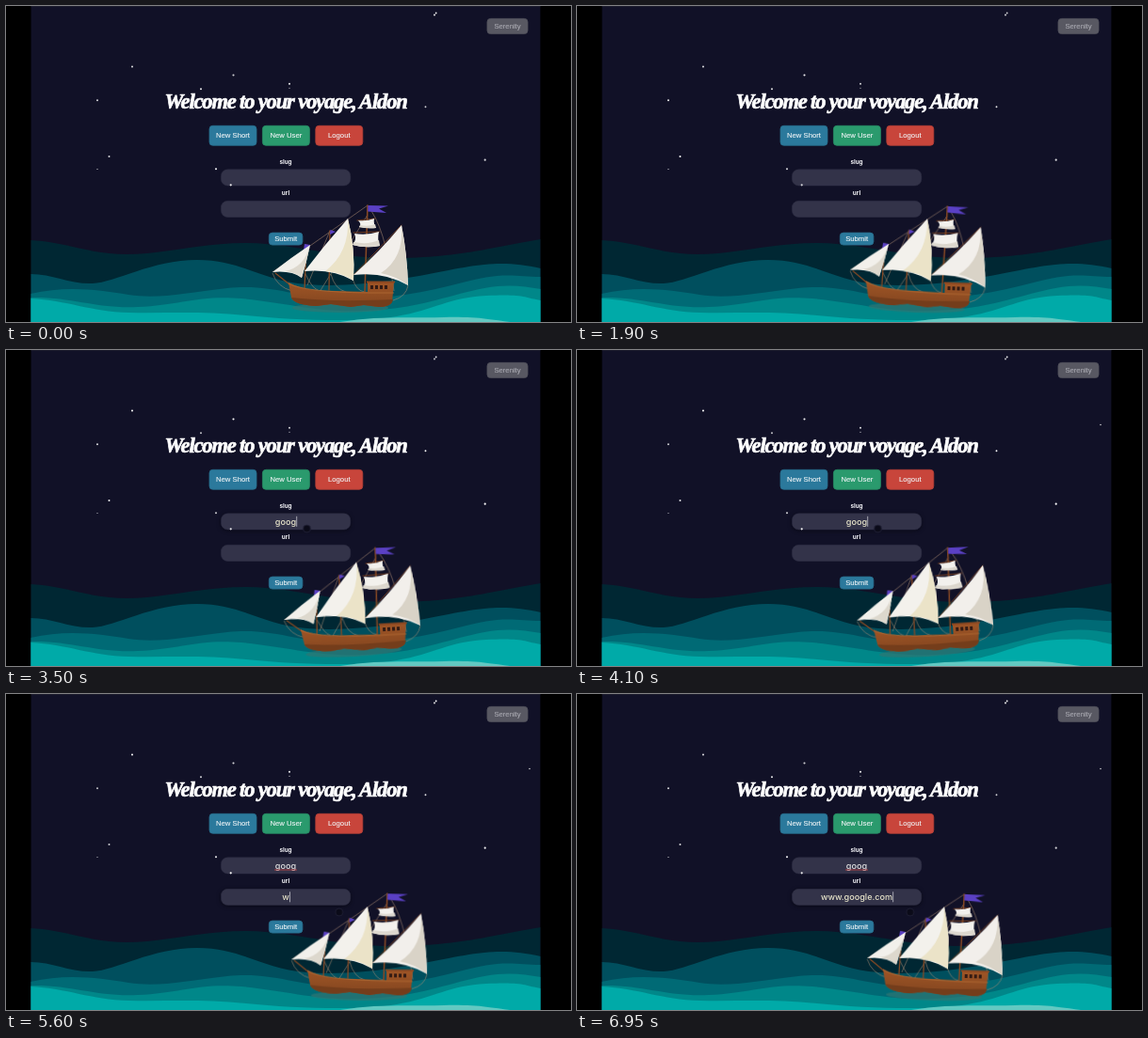
Recreate the animation shown at these times as an HTML page. Size 600 px wide and 336 px high, loop 7 s.

```html
<!DOCTYPE html>
<html lang="en">
<head>
<meta charset="utf-8">
<title>Voyage</title>
<style>
  html, body { margin: 0; width: 100%; height: 100%; overflow: hidden; background: #000; }
  svg { display: block; width: 100vw; height: 100vh; }
  text { text-anchor: middle; }
  .title { font: italic 700 22.5px "Liberation Serif", serif; letter-spacing: -1.15px; fill: #fff; stroke: #fff; stroke-width: .7px; }
  .button { font: 7.7px "Liberation Sans", sans-serif; fill: #f1f5f7; stroke: currentColor; stroke-width: .12px; color: #f1f5f7; }
  .label { font: 700 6.3px Inter, sans-serif; fill: #f4f4f8; }
  .value { font: 500 9.1px Inter, sans-serif; fill: #e6e3c9; }
  .field { fill: #333349; stroke: #2f2f45; stroke-width: .5; }

  #drift { animation: drift 7s linear infinite; }
  @keyframes drift { to { transform: translateX(25.2px); } }

  /* A five second roll, cut off by the seven second loop. */
  #rock { transform-origin: 355px 290px; animation: rock 7s infinite ease-in-out; }
  @keyframes rock {
    0%, 71.4% { transform: rotate(0deg); }
    24.3%, 95.7% { transform: rotate(2deg); }
    57% { transform: rotate(-3.8deg); }
    100% { transform: rotate(1.7deg); }
  }

  #pointer { animation: point 7s infinite ease-in-out; }
  @keyframes point {
    0%, 33% { transform: translate(341px, 215px); opacity: 0; }
    34% { transform: translate(341px, 215px); opacity: 1; }
    38%, 64% { transform: translate(319.5px, 190px); opacity: 1; }
    72%, 100% { transform: translate(353.7px, 232px); opacity: 1; }
  }

  .star { fill: #fff; animation: twinkle 3.5s infinite ease-in-out alternate; }
  @keyframes twinkle { from { opacity: 1; } to { opacity: .8; } }
  .late { animation: late 7s infinite; }
  @keyframes late { 0%, 54% { opacity: 0; } 57%, 100% { opacity: .8; } }
</style>
</head>
<body>
<svg viewBox="0 0 600 336" preserveAspectRatio="none">
  <defs>
    <clipPath id="page"><rect x="26.6" width="540.8" height="336"/></clipPath>
    <linearGradient id="wood" x2="0" y2="1">
      <stop stop-color="#9f5526"/><stop offset="1" stop-color="#82451f"/>
    </linearGradient>
  </defs>
  <g clip-path="url(#page)">
    <rect x="26" width="542" height="336" fill="#111127"/>
    <rect x="26" width="542" height=".7" fill="#22222f"/>

    <!-- sea -->
    <path fill="#002733" d="M26 249C65 251 88 264 128 264S205 252 255 252S350 269 415 268S510 258 568 248V336H26Z"/>
    <path fill="#004f5e" d="M26 285C50 285 68 296 92 295S155 270 203 270S270 292 320 296S425 290 470 281S535 272 568 279V336H26Z"/>
    <path fill="#006a75" d="M26 306C65 297 98 302 130 307S190 305 235 300S305 309 350 311S440 306 485 294S540 288 568 288V336H26Z"/>
    <path fill="#008789" d="M26 310C70 309 95 322 140 320S205 307 250 311S330 326 380 324S450 314 490 304S545 298 568 301V336H26Z"/>
    <path fill="#00aaa8" d="M26 311C65 313 90 325 130 326S205 324 255 329S375 337 415 330S470 310 510 308S550 310 568 313V336H26Z"/>
    <path fill="#62c9c2" d="M355 336C395 329 430 332 465 331S520 334 535 336Z"/>

    <text class="title" x="297" y="109.3">Welcome to your voyage, Aldon</text>
    <g id="buttons"></g>

    <text class="label" x="297" y="168">slug</text>
    <rect class="field" id="slugBox" x="228.4" y="173.8" width="137.4" height="17.2" rx="7"/>
    <text class="value" id="slug" x="297" y="185.7"></text>
    <path id="squiggle" fill="none" stroke="#c94343" stroke-width=".8"/>

    <text class="label" x="297" y="201">url</text>
    <rect class="field" id="urlBox" x="228.4" y="207.3" width="137.4" height="17.2" rx="7"/>
    <text class="value" id="url" x="297" y="219.2"></text>
    <rect id="caret" width=".7" height="11" fill="#d5d5dc"/>

    <g id="stars"></g>

    <!-- ship -->
    <g id="drift"><g id="rock">
      <ellipse cx="355" cy="321" rx="51" ry="5" fill="#2f7672" opacity=".7"/>
      <g fill="none" stroke="#a98a72" stroke-width=".55">
        <path d="M384 212L283 283M384 213Q402 232 412 303M344 239L320 297M384 222L333 304"/>
        <path d="M283 284Q288 299 304 303M318 285Q325 300 331 302M345 285Q349 301 361 304M368 290Q372 303 381 304M427 297Q425 309 411 313"/>
      </g>
      <g fill="none" stroke="#874823" stroke-linecap="round">
        <path stroke-width="1.5" d="M384 212L381 304"/>
        <path stroke-width="1.3" d="M344 239L343 302M319 254L317 301M286 284L306 300"/>
        <path stroke-width=".8" d="M373 228L392 226M369 241L397 240M420 233L368 287"/>
      </g>
      <g fill="#5a40c4">
        <path d="M384.4 212L406 212.5L396 215.5L404 220L384.2 218.5Z"/>
        <path d="M344.4 238L350 240L344 243ZM317 253L323 254L320 261L316 260Z"/>
      </g>
      <path fill="url(#wood)" d="M300 294Q313 301 334 302.5L384 304V293.5H412L410 315Q407 320 396 320L380 318L366 320L345 317L330 319Q306 318 303 310Z"/>
      <path fill="#743d1b" d="M303 310Q345 315 411 312L410 315Q407 320 396 320L380 318L366 320L345 317L330 319Q306 318 303 310Z"/>
      <path fill="none" stroke="#b26a33" stroke-width=".8" d="M300 295Q316 304 384 305H412"/>
      <path fill="#8c4720" d="M383 292.5H413V294.5H383Z"/>
      <g fill="#351b13">
        <rect x="387" y="297" width="3" height="4"/><rect x="392" y="297" width="3" height="4"/>
        <rect x="397" y="297" width="3" height="4"/><rect x="402" y="297" width="3" height="4"/>
      </g>
      <path fill="#f2f0eb" d="M323 254Q302 268 283 283Q303 281 314 289Q319 273 323 254Z"/>
      <path fill="#ddd8cd" d="M323 254Q317 278 296 282Q307 283 314 289Q319 273 323 254Z"/>
      <path fill="#f3f1ec" d="M363 226Q339 253 317 282Q347 279 369 292Q371 257 363 226Z"/>
      <path fill="#ebe3c8" d="M363 226Q365 262 339 282Q356 283 369 292Q371 257 363 226Z"/>
      <path fill="#f3f1ed" d="M374 228Q383 229 391 226Q390 232 393 236Q384 237 375 235Q378 232 374 228Z"/>
      <path fill="#f3f1ed" d="M370 242Q384 244 396 240Q394 248 397 255Q382 258 368 254Q373 248 370 242Z"/>
      <path fill="#dcd7ce" d="M369 251Q385 254 396 249L397 255Q382 258 368 254ZM376 233Q385 235 392 232L393 236Q384 237 375 235Z"/>
      <path fill="#f2efeb" d="M420 233Q397 261 369 286Q401 282 427 297Q426 264 420 233Z"/>
      <path fill="#d9d3c7" d="M420 233Q423 268 398 284Q414 287 427 297Q426 264 420 233Z"/>
    </g></g>

    <g id="pointer"><circle r="4" fill="#0b0b19" stroke="#24243a" stroke-width=".8"/></g>
  </g>
</svg>
<script>
  const LOOP = 7000, MID = 297;
  const el = id => document.getElementById(id);

  function add(parent, tag, attrs, label = "") {
    const node = document.createElementNS("http://www.w3.org/2000/svg", tag);
    for (const key in attrs) node.setAttribute(key, attrs[key]);
    node.textContent = label;
    parent.append(node);
    return node;
  }

  function button(label, x, y, width, height, fill, stroke, ink = "") {
    add(el("buttons"), "rect", { x, y, width, height, rx: 3.6, fill, stroke, "stroke-width": .8 });
    const text = add(el("buttons"), "text", { class: "button", x: x + width / 2, y: y + height / 2 + 2.4 }, label);
    text.style.fill = text.style.color = ink;
  }
  button("New Short", 216, 127.3, 50, 21, "#2b799c", "#286f8f");
  button("New User", 272.4, 127.3, 50, 21, "#2a9a6d", "#278d65");
  button("Logout", 328.8, 127.3, 50, 21, "#c8453b", "#b53f37");
  button("Submit", 279.3, 241.1, 35.6, 13, "#2b799c", "#286f8f");
  button("Serenity", 511, 13.4, 43, 16.2, "#585862", "#53535d", "#a9a9b1");

  // x, y, radius
  const stars = [
    [455, 9.5, .9], [456.7, 7.5, .9], [134, 64.5, 1.05], [241.5, 73.5, 1.05],
    [97, 100.3, .95], [207, 88.3, .95], [301, 82.7, 1], [301, 87.3, .55],
    [445.5, 107.3, .95], [109.5, 160, 1], [97, 173.5, .55], [223, 173.3, 1],
    [238.7, 190.3, 1.1], [508.7, 163.7, 1.1]
  ];
  stars.forEach(([cx, cy, r], i) => {
    add(el("stars"), "circle", { class: "star", cx, cy, r }).style.animationDelay = -i * 1.3 + "s";
  });
  add(el("stars"), "circle", { class: "star late", cx: 556, cy: 79.5, r: .8 });

  let wave = "M285 187.4";
  for (let x = 286; x <= 309; x++) wave += `L${x} ${x % 2 ? 187.4 : 186.6}`;
  el("squiggle").setAttribute("d", wave);

  function setText(node, value) {
    if (node.textContent !== value) node.textContent = value;
  }

  function draw(t) {
    const address = "www.google.com";
    const count = t < 5560 ? 0 : Math.min(address.length, 1 + Math.floor((t - 5560) / 95));
    const onSlug = t >= 3050 && t < 5050, onUrl = t >= 5050;
    const slug = el("slug"), url = el("url");

    setText(slug, t >= 2600 ? "goog" : "");
    slug.style.fill = t < 3050 ? "#85858c" : onUrl ? "#dedede" : "#e6e3c9";
    setText(url, address.slice(0, count));
    el("squiggle").style.opacity = onUrl ? 1 : 0;

    const glow = "drop-shadow(0 1px 2px #080816)";
    el("slugBox").style.filter = onSlug ? glow : "none";
    el("urlBox").style.filter = onUrl ? glow : "none";

    const field = onUrl ? url : slug;
    const blink = count > 0 || Math.floor((t - 3050) / 500) % 2 === 0;
    const caret = el("caret");
    caret.style.opacity = (onSlug || onUrl) && blink ? 1 : 0;
    const width = field.textContent ? field.getComputedTextLength() : 0;
    caret.setAttribute("x", MID + width / 2 + .3);
    caret.setAttribute("y", onUrl ? 210.3 : 176.8);
  }

  let start;
  function tick(now) {
    start ??= now;
    draw((now - start) % LOOP);
    requestAnimationFrame(tick);
  }
  draw(0);
  requestAnimationFrame(tick);
</script>
</body>
</html>
```
